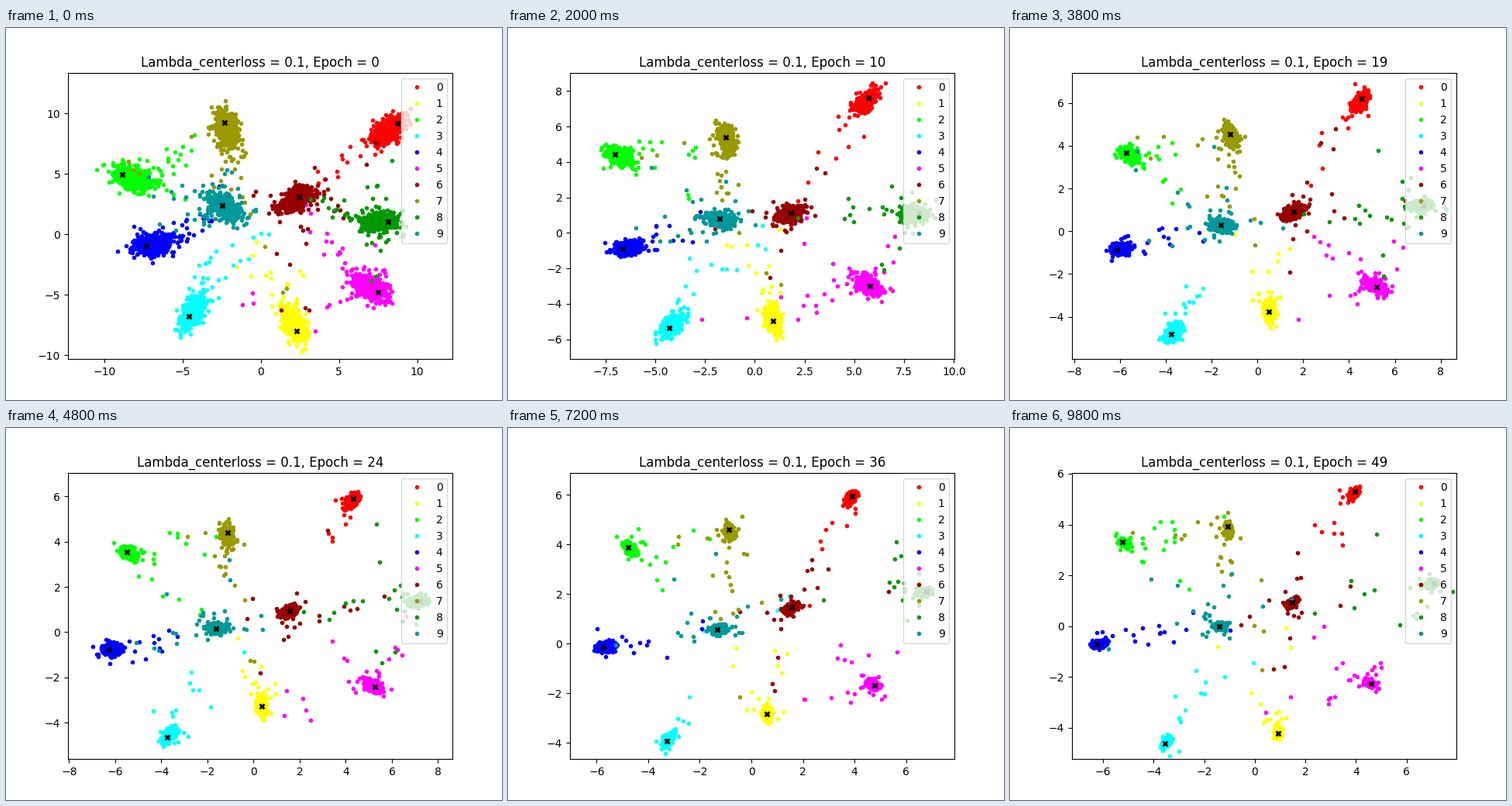
A matplotlib script that plays this animation: 640x480 px, repeating every 10000 ms.

```python
import numpy as np
import matplotlib.pyplot as plt
from matplotlib.animation import FuncAnimation

EPOCHS = 50
CLOUD = 500
MIDDLE = np.array([320, 255])
LEFT, RIGHT, TOP, BOTTOM = 80, 576, 57.6, 427.2

# view limits shrink as the classes are pulled together
VIEW_AT = [0, 6, 14, 19, 28, 36, 49]
X_MIN = [-12.33, -10.33, -8.24, -8.10, -8.01, -7.03, -7.23]
X_MAX = [12.25, 11.20, 8.85, 8.69, 8.57, 7.87, 7.97]
Y_MIN = [-10.33, -8.615, -5.62, -5.98, -5.32, -4.65, -5.23]
Y_MAX = [13.36, 10.73, 7.35, 7.42, 6.76, 6.90, 6.04]

# colour, classes its strays lean to, centre on the stage at PATH_AT
PATH_AT = [0, 6, 28, 49]
DIGITS = [
    ('#ff0000', '66', [(505, 123), (470, 90), (443, 91), (445, 82)]),
    ('#ffff00', '996', [(375, 391), (346, 384), (326, 353), (346, 394)]),
    ('#00ff00', '7779', [(150, 189), (133, 164), (161, 159), (145, 147)]),
    ('#00ffff', '996', [(236, 372), (208, 384), (208, 402), (200, 407)]),
    ('#0000ff', '9999', [(181, 281), (152, 285), (129, 286), (112, 279)]),
    ('#ff00ff', '66813', [(480, 341), (465, 333), (478, 334), (466, 330)]),
    ('#990000', '8019', [(378, 218), (364, 240), (367, 235), (364, 225)]),
    ('#999900', '229991', [(282, 122), (280, 142), (287, 134), (281, 127)]),
    ('#009900', '6605', [(493, 250), (529, 244), (535, 218), (547, 200)]),
    ('#009999', '44762', [(279, 229), (274, 243), (270, 262), (270, 256)]),
]


def centre(path, epoch):
    return np.array([np.interp(epoch, PATH_AT, axis) for axis in zip(*path)])


def cloud(spot, epoch, rng):
    """Ellipse whose long axis points at the middle, tighter every epoch."""
    z = rng.normal(size=(CLOUD, 2))
    z[:CLOUD // 12] *= 1.6
    size = 2.5 + 8.5 * np.exp(-epoch / 20)
    out = (spot - MIDDLE) / np.linalg.norm(spot - MIDDLE)
    side = np.array([-out[1], out[0]])
    return spot + size * (z[:, :1] * out + 0.52 * z[:, 1:] * side)


def strays(spot, ends, epoch, rng):
    """Loose dots, thinning out on the way to other classes."""
    n = round(len(ends) * (5 + 8 * np.exp(-epoch / 8)))
    to = ends[rng.integers(len(ends), size=n)]
    u = rng.beta(0.6, 1.6, size=(n, 1))
    return spot + (to - spot) * u + rng.normal(scale=10, size=(n, 2))


def to_data(pts, lim):
    x0, x1, y0, y1 = lim
    return (x0 + (pts[:, 0] - LEFT) / (RIGHT - LEFT) * (x1 - x0),
            y0 + (BOTTOM - pts[:, 1]) / (BOTTOM - TOP) * (y1 - y0))


fig, ax = plt.subplots(figsize=(6.4, 4.8), dpi=100)
dots = [ax.plot([], [], '.', c=color, label=str(i))[0]
        for i, (color, _, _) in enumerate(DIGITS)]
marks, = ax.plot([], [], 'kx', mew=2, ms=4)
ax.legend(handles=dots, loc='upper right')
title = ax.set_title('')


def draw(epoch):
    rng = np.random.default_rng(100 + epoch)
    lim = [np.interp(epoch, VIEW_AT, v) for v in (X_MIN, X_MAX, Y_MIN, Y_MAX)]
    ax.set_xlim(lim[0], lim[1])
    ax.set_ylim(lim[2], lim[3])

    centres = np.array([centre(path, epoch) for _, _, path in DIGITS])
    lag = 0.015 + 0.05 * np.exp(-epoch / 6)
    spots = centres + (MIDDLE - centres) * lag
    for line, spot, (_, ties, _) in zip(dots, spots, DIGITS):
        ends = spots[[int(t) for t in ties]]
        pts = np.vstack([cloud(spot, epoch, rng),
                         strays(spot, ends, epoch, rng)])
        line.set_data(*to_data(pts, lim))
    marks.set_data(*to_data(centres, lim))
    title.set_text(f'Lambda_centerloss = 0.1, Epoch = {epoch}')
    return [*dots, marks, title]


anim = FuncAnimation(fig, draw, frames=EPOCHS, interval=200,
                     init_func=lambda: draw(0), repeat=True, repeat_delay=0)
plt.show()
```
